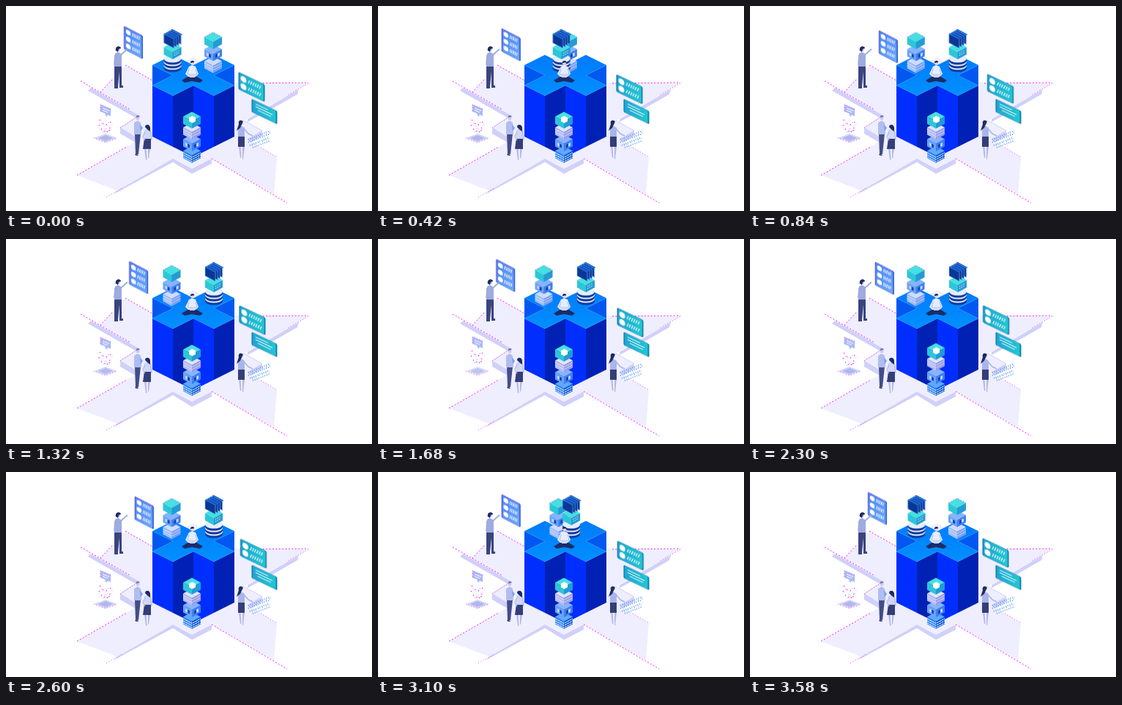
Recreate the animation shown at these times as an HTML page. Size 500 by 281 pixels, loop 3600 ms.

```html
<!DOCTYPE html>
<html lang="en">
<head>
<meta charset="utf-8">
<title>Isometric data block</title>
<style>
html, body { margin: 0; width: 100%; height: 100%; overflow: hidden; background: #fff; }
svg { display: block; width: 100vw; height: 100vh; }
.fringe { fill: none; stroke: #f0f; stroke-width: .9; stroke-dasharray: 2 2.4; }
.thin { stroke-width: .7; stroke-dasharray: 1.2 2.6; }
.line { fill: none; stroke: #fff; stroke-width: 1; }
.top { fill: var(--t); }
.left { fill: var(--l); }
.right { fill: var(--r); }
.teal { --t: #45e0e0; --l: #2cc6d8; --r: #239bd4; }
.azure { --t: #86b4ff; --l: #6ba2fa; --r: #3f7fee; }
.pale { --t: #e2e4ff; --l: #b6bcf4; --r: #989fe6; }
.mist { --t: #cfdcff; --l: #a4befb; --r: #7b9ff2; }
.blue { --t: #5ea9ff; --l: #2e86f5; --r: #0e5bd6; }

.panel-l { animation: slide-l .9s -40ms cubic-bezier(.37, 0, .63, 1) infinite alternate; }
.panel-r { animation: slide-r .6s cubic-bezier(.37, 0, .63, 1) infinite alternate; }
.servers { animation: swap-l 3.6s cubic-bezier(.65, 0, .35, 1) infinite; }
.cubes { animation: swap-r 3.6s cubic-bezier(.65, 0, .35, 1) infinite; }
.lift { animation: lift 3.6s ease-in-out infinite; }
.bubble { animation: bob 3.6s ease-in-out infinite; }
.sparks { animation: rise 3.6s ease-in-out infinite; }
.pad { animation: dim 3.6s ease-in-out infinite; }

@keyframes slide-l { to { transform: translate(15px, 6px); } }
@keyframes slide-r { to { transform: translate(10px, 4px); } }
@keyframes swap-l {
  0%, 100% { transform: translate(227.5px, 0); }
  25%, 75% { transform: translate(284px, 0); }
}
@keyframes swap-r {
  0%, 100% { transform: translate(283px, 0); }
  25%, 75% { transform: translate(226.5px, 0); }
}
@keyframes lift { 0%, 46%, 72%, 100% { transform: none; } 56%, 60% { transform: translate(0, -3px); } }
@keyframes bob { 0%, 31%, 74%, 100% { transform: none; } 52% { transform: translate(0, -1.5px); } }
@keyframes rise { 0%, 31%, 60%, 100% { transform: none; } 46% { transform: translate(0, -3px); } }
@keyframes dim { 0%, 31%, 60%, 100% { opacity: 1; } 46%, 55% { opacity: .8; } }
</style>
</head>
<body>
<svg viewBox="0 0 500 281" preserveAspectRatio="none">
<defs>
  <linearGradient id="deck" x2="0" y2="1"><stop stop-color="#007afa"/><stop offset="1" stop-color="#0090ff"/></linearGradient>
  <linearGradient id="sky" x2="1" y2="1"><stop stop-color="#4a86f2"/><stop offset="1" stop-color="#6ea6fc"/></linearGradient>
  <linearGradient id="sea" x2="1" y2="0"><stop stop-color="#1ea6d0"/><stop offset="1" stop-color="#22c6d2"/></linearGradient>

  <g id="cube">
    <path class="top" d="M0 0l12 6.5-12 6.5-12-6.5z"/>
    <path class="left" d="M-12 6.5L0 13v10l-12-6.5z"/>
    <path class="right" d="M12 6.5L0 13v10l12-6.5z"/>
  </g>
  <g id="striped">
    <use href="#cube" class="blue"/>
    <path class="line" stroke-dasharray="3 .7" d="M-12 9l12 6.5L12 9M-12 12l12 6.5 12-6.5M-12 15l12 6.5 12-6.5"/>
  </g>
  <g id="ribbed">
    <use href="#cube"/>
    <path class="line" stroke-dasharray="1.3 1.2" d="M-12 9l12 6.5L12 9M-12 12.5l12 6.5 12-6.5"/>
  </g>
  <g id="windows">
    <use href="#cube" class="azure"/>
    <path fill="#1246b4" d="M-9 11l6 3.2v4.6l-6-3.2zM9 11l-6 3.2v4.6l6-3.2z"/>
    <path fill="#b9d8ff" d="M-9 11l3 1.6v4.6l-3-1.6zM9 11l-3 1.6v4.6l3-1.6z"/>
  </g>
  <g id="slab">
    <path d="M0 0l14 7.5V20L0 12.5z" fill="#0a3796" stroke="#6fb9ff" stroke-width=".6"/>
    <path d="M0 0l2-1 14 7.5-2 1z" fill="#1765d8"/>
  </g>
  <g id="disc">
    <path d="M-12 0v3a12 5.5 0 0 0 24 0V0z" fill="#123a9c"/>
    <ellipse rx="12" ry="5.5" fill="#e4edff"/>
  </g>
  <g id="row">
    <circle cx="5.5" cy="4.5" r="3.3" fill="#fff"/>
    <path class="line" stroke-width="1.1" d="M11 7l1-5M13.200 7l1-5M15.400 7l1-5M17.600 7l1-5M19.800 7l1-5"/>
  </g>
  <g id="wide-row">
    <circle cx="6.500" cy="4.500" r="3.900" fill="#fff"/>
    <path class="line" stroke-width="1.200" d="M13 7l2-5M16 7l2-5M19 7l2-5M22 7l2-5M25 7l2-5M28 7l2-5"/>
  </g>
</defs>

<!-- floor -->
<path fill="#d0d0fa" d="M116 112L182 150V156L112 116zM400 114L330 155V159L365 140 398 121zM152 253L147 258 228 214 254 230 281 216V209L254 223 228 209z"/>
<path fill="#d0d0fa" d="M156 167L182 182V190L156 175zM350 171L330 183V190L350 178z"/>
<path fill="#eeeeff" d="M163 81L129 118 182 150 156 167 182 183 97 232 152 253 228 209 254 223 281 209 366 258 370 207 330 183 350 171 325 157 413 106 312 105 256 70 200 102z"/>
<path fill="none" stroke="#cfcff8" d="M182 150L156 167 182 183M325 157L350 171 330 183"/>
<path class="fringe" d="M102 103L170 142M145 101L129 118M163 81L200 102M97 232L165 193M281 209L384 270M320 106L413 105"/>
<path class="fringe thin" d="M137 262L160 249M156 167L176 154M348 194L370 207M413 106L385 122"/>

<!-- block -->
<path fill="#002eff" d="M200 109l28 14v70l-28-14zM256 109l28 14v70l-28 14z"/>
<path fill="#0021b4" d="M228 123l28-14v98l-28-14zM284 123l28-14v70l-28 14z"/>
<path fill="#0058f0" d="M200 81l28 14-28 14zM312 81l-28 14 28 14z"/>
<path fill="url(#deck)" d="M228 67l28 14 28-14 28 14-28 14 28 14-28 14-28-14-28 14-28-14 28-14-28-14z"/>

<!-- swapping stacks -->
<g class="cubes">
  <use href="#ribbed" class="mist" y="69"/>
  <use href="#windows" y="52.500"/>
  <use href="#cube" class="teal" y="36"/>
  <path class="fringe thin" d="M-12 42.5L0 36l12 6.5"/>
</g>
<g class="servers">
  <use href="#disc" y="82"/><use href="#disc" y="77"/><use href="#disc" y="72"/>
  <use href="#cube" class="teal" y="50"/>
  <path class="line" stroke-dasharray="1.5 1.5" d="M2 65l8-4.5M2 68l8-4.5"/>
  <use href="#slab" x="-2.4" y="32.6"/><use href="#slab" x="-5.6" y="34.4"/>
  <use href="#slab" x="-8.8" y="36.2"/><use href="#slab" x="-12" y="38"/>
</g>

<!-- seated figure -->
<g>
  <path fill="#1d2b66" d="M240 102l10-6h9l10 6-4 3-11-2-10 2z"/>
  <path fill="#e6ecff" d="M250 83l4-2 5 2 4 10-4 4h-10l-4-4z"/>
  <path fill="none" stroke="#a9bcf2" d="M250 86l-2 7 4 2M259 86l2 7-4 2"/>
  <path fill="#cdd6fb" d="M250 93h9l-1 5h-7z"/>
  <circle cx="254.5" cy="78.5" r="2.4" fill="#e9d3ea"/>
  <path fill="#15204f" d="M251.8 78c0-4 5.4-4 5.4-.7z"/>
</g>

<!-- front stack -->
<g transform="translate(254 0)">
  <use href="#striped" y="192"/>
  <use href="#windows" y="176"/>
  <g class="lift">
    <use href="#ribbed" class="pale" y="160"/>
    <use href="#cube" class="teal" y="145"/>
    <path fill="#fff" d="M.5 150.5l4.5 2.5v5l-4.5 2.5-4.5-2.5v-5z"/>
  </g>
</g>

<!-- left panel -->
<g class="panel-l">
  <g transform="matrix(1 .52 0 1 161.500 28)">
    <rect x="-.5" y="-.6" width="26" height="32" rx="1.5" fill="#2a5cd6"/>
    <rect x=".5" width="23.500" height="31" rx="1.5" fill="url(#sky)"/>
    <use href="#row" y="1"/><use href="#row" y="10.5"/><use href="#row" y="20"/>
    <path class="fringe thin" d="M24 0H0v31"/>
  </g>
</g>

<!-- right panels -->
<g class="panel-r">
  <g transform="matrix(1 .48 0 1 318 91)">
    <rect x="-.5" y="-.6" width="36" height="24" rx="2" fill="#0d74ac"/>
    <rect x=".7" width="33.300" height="23" rx="2" fill="url(#sea)"/>
    <use href="#wide-row" y="2"/><use href="#wide-row" y="12"/>
  </g>
</g>
<g transform="matrix(1 .48 0 1 336 128)">
  <rect x="-.5" y="-.6" width="35" height="18" rx="1.5" fill="#0d74ac"/>
  <rect x=".7" width="32" height="17" rx="1.5" fill="url(#sea)"/>
  <path class="line" d="M5 4h17M5 7.5h23M8 11h18"/>
</g>

<!-- bubble and pad -->
<g class="pad">
  <path fill="#d3d7f6" d="M120 181l16-6 16 6-16 6z"/>
  <path fill="#aeb8ec" d="M126 181l10-4 10 4-10 4z"/>
  <path class="fringe thin" d="M120 181l16 6 16-6"/>
</g>
<g class="sparks">
  <path fill="none" stroke="#f0f" stroke-width="1.2" stroke-dasharray="1.3 5" d="M128 156l7 8 10-6M127 163l5 9 12-2M138 173l7-11"/>
  <path fill="none" stroke="#8f9be2" stroke-dasharray="1 4" d="M130 160l12 14M140 159l-8 15"/>
</g>
<g class="bubble">
  <path fill="#a9b9f8" d="M129 135l14 6v10l-4-2-2 3-2-5-6-2z"/>
  <path class="line" stroke-width=".8" d="M132 140l9 3.700M132 143l7 2.800"/>
  <path class="fringe thin" d="M143 141l-14-6v10"/>
</g>

<!-- pointing figure -->
<g>
  <path fill="#3a447e" d="M148 82h10v27h2v3h-5v-22l-2 20v3h-5z"/>
  <path fill="#9eabdf" d="M149 65l4-2 5 3v17h-10v-10z"/>
  <path fill="none" stroke="#9eabdf" stroke-width="1.700" d="M157 67l9-8M149 67l-1 14"/>
  <circle cx="153.500" cy="59.500" r="2.500" fill="#d8c5e4"/>
  <path fill="#1d2b66" d="M149.800 61c-1-7 7-7 7.200-3l-3 1-1 4z"/>
</g>

<!-- couple -->
<g>
  <path fill="#434d88" d="M176 175h8l-3 28h-4z"/>
  <path fill="#b0bdf0" d="M175 160l5-3 4 3 1 16h-10z"/>
  <path fill="#7aa0f0" d="M183 162l4 5-3 5z"/>
  <path stroke="#1d2b66" stroke-width="1.700" d="M176.500 203.500l4 1"/>
  <circle cx="180" cy="154" r="2.300" fill="#d8c5e4"/>
  <path fill="#6f7cba" d="M177.500 153c0-4 5-4 5.200-1z"/>

  <path fill="#b4b9e2" d="M189 195h2.500l1 16h-1.500zM194 195h3l-2 14h-1z"/>
  <path fill="#343e78" d="M189 181h9v15h-11z"/>
  <path fill="#cfd6f8" d="M189 170l4-2 5 2v12h-9z"/>
  <path fill="none" stroke="#b4b9e2" stroke-width="1.300" d="M190 172l-3 7 3 5M198 172l1 12"/>
  <circle cx="192.500" cy="165.500" r="2.300" fill="#d8c5e4"/>
  <path fill="#1d2b66" d="M190 166c0-5 7-4 7 1v5l-3-2z"/>
</g>

<!-- woman at the chart -->
<g>
  <path fill="#b4b9e2" d="M318 192h2.500l1 16h-1.500zM323 192h3l-2 18h-1z"/>
  <path fill="#343e78" d="M317 178h9v15h-9z"/>
  <path fill="#a9b5ea" d="M317 167l4-3 5 3v12h-9z"/>
  <path fill="none" stroke="#a9b5ea" stroke-width="1.600" d="M325 168l6 7 6 3"/>
  <circle cx="321.500" cy="160.500" r="2.400" fill="#d8c5e4"/>
  <path fill="#1d2b66" d="M324 158c-5-3-7 0-6 4l-3 9 5-4z"/>
  <path fill="none" stroke="#5f90f2" stroke-width="1.800" stroke-dasharray="1 1.900" d="M331 183l30-12M331 187l30-12M333 191l27-11M337 194l23-9"/>
  <path fill="none" stroke="#29c3d2" stroke-width="1.200" stroke-dasharray="1 4" d="M332 185l29-12M336 191l24-9"/>
</g>
</svg>
</body>
</html>
```
